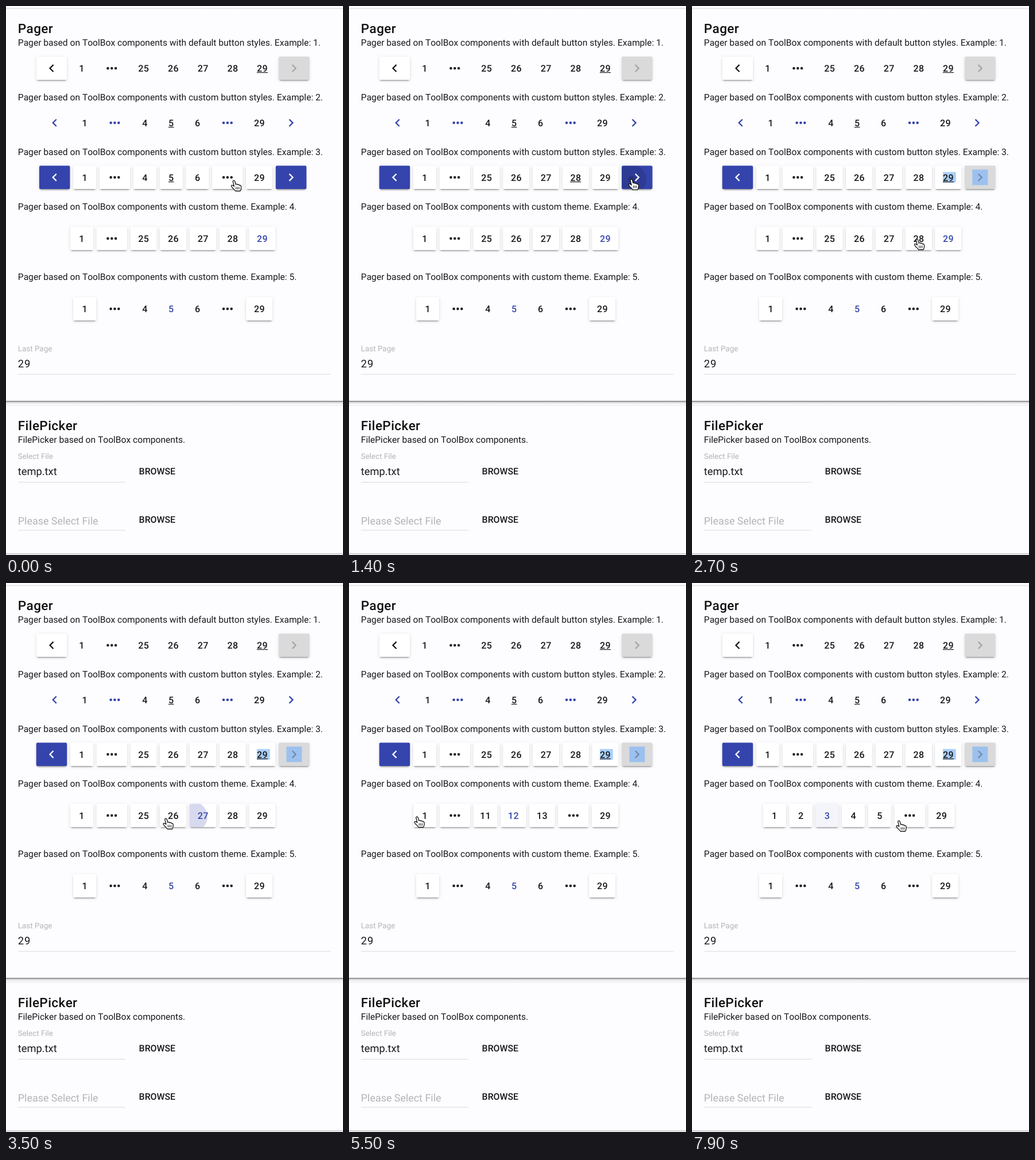
Write an HTML page with a canvas that moves like this. It is 587 px wide and 954 px high and loops after 8 s.

```html
<!DOCTYPE html>
<html lang="en">
<head>
<meta charset="utf-8">
<title>Pager and FilePicker</title>
<style>
html, body { margin: 0; width: 100%; height: 100%; overflow: hidden; background: #fdfcfe; }
canvas { display: block; width: 587px; height: 954px; }
</style>
</head>
<body>
<canvas id="stage"></canvas>
<script>
const W = 587, H = 954, LOOP = 8000, STEP = 100;
const MID = 290.6, GAP = 5.5, BTN_H = 40.6, LAST = 29, UNIT = 1.139;
const INK = '#18181a', BLUE = '#3544ac', FAINT = '#b4b4b7', RULE = '#d9d9dc';
const FONT = 'Roboto, Arial, sans-serif';

const canvas = document.getElementById('stage');
const ctx = canvas.getContext('2d');
const dpr = window.devicePixelRatio || 1;
canvas.width = W * dpr;
canvas.height = H * dpr;

// Clicks: time, page shown afterwards, key of the button pressed, ripple centre
const clicks3 = [
  [100, 17, 'dotsR', 396, 303], [300, 23, 'dotsR', 396, 303], [500, 26, 'dotsR', 396, 303],
  [1200, 27, 'next', 492, 301], [1400, 28, 'next', 492, 301], [1600, 29, 'next', 492, 301]
];
const clicks4 = [
  [3300, 27, 27, 325, 406], [3700, 26, 26, 279, 409], [4100, 25, 25, 235, 408],
  [4600, 12, 'dotsL', 183, 407], [5600, 1, 1, 119, 406], [7200, 3, 3, 240, 412]
];
const SELECT_AT = 1800;

// Pointer path: time, x, y of the tip
const path = [
  [0, 397, 303], [900, 397, 303], [1200, 492, 301], [1900, 490.5, 300], [2100, 490.5, 300],
  [2700, 392, 405], [2900, 392, 405], [3300, 330, 408], [3500, 278.5, 409], [3800, 278.5, 409],
  [4100, 235, 408], [4200, 235, 408], [4500, 183, 407], [4800, 183, 407], [5400, 118.5, 406],
  [5700, 118.5, 406], [6300, 384.5, 413], [6500, 384.5, 413], [7000, 240, 412],
  [7300, 240, 412], [7900, 360.5, 413]
];

function pointerAt(t) {
  const i = path.findIndex(p => p[0] > t);
  if (i < 0) return path[path.length - 1].slice(1);
  const [t0, x0, y0] = path[i - 1], [t1, x1, y1] = path[i];
  const u = (t - t0) / (t1 - t0), e = u * u * (3 - 2 * u);
  return [x0 + (x1 - x0) * e, y0 + (y1 - y0) * e];
}

function pageAt(clicks, t, first) {
  return clicks.reduce((page, c) => t >= c[0] ? c[1] : page, first);
}

function text(str, x, y, size, color = INK, weight = 400, spacing = 0, align = 'left') {
  ctx.font = `${weight} ${size}px ${FONT}`;
  ctx.letterSpacing = spacing + 'px';
  ctx.textAlign = align;
  ctx.fillStyle = color;
  ctx.fillText(str, x, y);
}

function rect(x, y, w, h, color) {
  ctx.fillStyle = color;
  ctx.fillRect(x, y, w, h);
}

function box(x, y, w, h, r = 2.2) {
  ctx.beginPath();
  ctx.roundRect(x, y, w, h, r);
}

function raised(b, y, color) {
  // offset, blur, inset, opacity
  for (const [dy, blur, inset, a] of [[1, 5, 0, .12], [2, 2, 0, .14], [3, 1, 2, .2]]) {
    ctx.save();
    ctx.shadowColor = `rgba(0,0,0,${a})`;
    ctx.shadowOffsetY = dy * UNIT * dpr;
    ctx.shadowBlur = blur * UNIT * dpr;
    ctx.fillStyle = color;
    // inset keeps the repeated fills from thickening the button edge
    const d = Math.max(inset, .5);
    box(b.x + d, y + d, b.w - 2 * d, BTN_H - 2 * d);
    ctx.fill();
    ctx.restore();
  }
  ctx.fillStyle = color;
  box(b.x, y, b.w, BTN_H);
  ctx.fill();
}

function icon(key, cx, cy, color) {
  ctx.save();
  ctx.translate(cx, cy);
  ctx.scale(UNIT, UNIT);
  ctx.fillStyle = color;
  ctx.beginPath();
  if (key === 'prev' || key === 'next') {
    if (key === 'next') ctx.scale(-1, 1);
    [[3.41, -4.59], [2, -6], [-4, 0], [2, 6], [3.41, 4.59], [-1.17, 0]].forEach(p => ctx.lineTo(...p));
  } else {
    for (const x of [-6, 0, 6]) {
      ctx.moveTo(x + 2, 0);
      ctx.arc(x, 0, 2, 0, 7);
    }
  }
  ctx.fill();
  ctx.restore();
}

function btnWidth(key) {
  if (typeof key === 'string') return 53.5;
  if (key < 10) return 40.3;
  if (key === 11) return 42;
  return key < 20 ? 44.5 : 46.2;
}

function layout(page, arrows) {
  let keys;
  if (page <= 3) keys = [1, 2, 3, 4, 5, 'dotsR', LAST];
  else if (page >= LAST - 2) keys = [1, 'dotsL', 25, 26, 27, 28, LAST];
  else keys = [1, 'dotsL', page - 1, page, page + 1, 'dotsR', LAST];
  if (arrows) keys = ['prev', ...keys, 'next'];
  const total = keys.reduce((s, k) => s + btnWidth(k) + GAP, -GAP);
  let x = MID - total / 2;
  return keys.map(key => {
    const b = { key, x, w: btnWidth(key) };
    b.off = key === 'next' && page === LAST;
    x += b.w + GAP;
    return b;
  });
}

function ripples(b, y, clicks, t, rgb, strength) {
  for (const [t0, , key, cx, cy] of clicks) {
    const age = t - t0;
    if (key !== b.key || b.off || age < 0 || age >= 900) continue;
    ctx.save();
    box(b.x, y, b.w, BTN_H);
    ctx.clip();
    ctx.fillStyle = `rgba(${rgb},${strength * (1 - age / 900)})`;
    ctx.beginPath();
    ctx.arc(cx, cy, 6 + age * .1, 0, 7);
    ctx.fill();
    ctx.restore();
  }
}

// style: arrows, arrowFill, iconColor, lift(key), mark ('line' or 'blue'), clicks, rgb, strength
function pager(cy, page, style, t, selected) {
  const y = cy - BTN_H / 2;
  const row = layout(page, style.arrows);
  for (const b of row) {
    const arrow = b.key === 'prev' || b.key === 'next';
    const cx = b.x + b.w / 2;
    const lifted = style.lift(b.key);
    if (lifted) raised(b, y, b.off ? '#dadadb' : arrow ? style.arrowFill : '#fff');
    if (style.clicks) ripples(b, y, style.clicks, t, style.rgb, style.strength);
    if (typeof b.key === 'string') {
      if (b.off && selected) rect(cx - 13.4, cy - 13.6, 27, 27, '#9cc1ef');
      let color = style.iconColor || INK;
      if (arrow && lifted) color = style.arrowFill === BLUE ? '#fff' : INK;
      if (b.off) color = selected ? '#7489aa' : '#a5a5a7';
      icon(b.key, cx, cy, color);
    } else {
      const current = b.key === page;
      if (current && selected) rect(cx - 9.5, cy - 9.3, 22.8, 18.4, '#a9cff9');
      const color = current && style.mark === 'blue' ? BLUE : INK;
      text(String(b.key), cx + .2, cy + 5.7, 16, color, 500, .4, 'center');
      if (current && style.mark === 'line') {
        const half = b.key < 10 ? 4.8 : 9.5;
        rect(cx - half, Math.round(cy + 7.2), half * 2, 1.2, INK);
      }
    }
  }
  return row.filter(b => !b.off).map(b => ({ x: b.x, y, w: b.w }));
}

const styles = [
  { arrows: true, arrowFill: '#fff', mark: 'line', lift: k => k === 'prev' || k === 'next' },
  { arrows: true, iconColor: BLUE, mark: 'line', lift: () => false },
  { arrows: true, arrowFill: BLUE, mark: 'line', lift: () => true,
    clicks: clicks3, rgb: '0,0,0', strength: .17 },
  { mark: 'blue', lift: () => true, clicks: clicks4, rgb: '53,68,172', strength: .25 },
  { mark: 'blue', lift: k => k === 1 || k === LAST }
];

const HAND = new Path2D('M-1.7 2Q-1.8.2-.2.2Q1.3.2 1.8 2L3.2 7Q5.4 5.6 6.4 7.6Q8.6 6.6 9.5 8.6' +
  'Q12.6 8 12.6 11V13.5Q12.3 16 11 18.5H2.6Q.8 15.7-2 13.6L-4.2 10.6Q-5 8.8-3.5 8.4Q-2 8.2.3 10.4Z');
const ARROW = new Path2D('M0 0V15.6L3.6 12.2L6 17.8L8.6 16.7L6.2 11.2H11.2Z');

function hand(x, y) {
  ctx.save();
  ctx.translate(x, y);
  ctx.lineJoin = ctx.lineCap = 'round';
  ctx.fillStyle = '#fff';
  ctx.strokeStyle = '#111';
  ctx.lineWidth = 1.3;
  ctx.fill(HAND);
  ctx.stroke(HAND);
  ctx.lineWidth = 1;
  ctx.beginPath();
  for (const lx of [3.7, 6.3, 8.9]) {
    ctx.moveTo(lx, 11.8);
    ctx.lineTo(lx + .1, 15.3);
  }
  ctx.stroke();
  ctx.restore();
}

function arrow(x, y) {
  ctx.save();
  ctx.translate(x, y);
  ctx.strokeStyle = '#fff';
  ctx.lineWidth = 2;
  ctx.lineJoin = 'round';
  ctx.stroke(ARROW);
  ctx.fillStyle = '#000';
  ctx.fill(ARROW);
  ctx.restore();
}

function shade(y, h, from, to) {
  const g = ctx.createLinearGradient(0, y, 0, y + h);
  g.addColorStop(0, from);
  g.addColorStop(1, to);
  rect(0, y, W, h, g);
}

function cards() {
  rect(0, 0, W, H, '#fdfcfe');
  shade(3, 3, '#efeff1', '#f2f2f4');
  rect(0, 4, W, 1, '#e8e8ea');
  rect(0, 686, W, 2, '#98989b');
  shade(688, 4, '#d2d2d5', '#f8f8fa');
  rect(0, 693, W, 1.5, '#ededef');
  rect(0, 951, W, 2, '#cfcfd2');
}

function labels() {
  const x = 20.8;
  ctx.fontKerning = 'none';
  text('Pager', x, 47, 22.5, '#111', 500, .4);
  const tails = ['default button styles', 'custom button styles', 'custom button styles', 'custom theme', 'custom theme'];
  const lines = [69, 164, 259, 353.5, 476];
  tails.forEach((s, i) =>
    text(`Pager based on ToolBox components with ${s}. Example: ${i + 1}.`, x, lines[i], 15.6));

  text('Last Page', x, 599.5, 13.4, FAINT);
  text('29', x, 627.5, 18.4, INK, 400, .9);
  rect(21, 639.5, 544.5, 1, RULE);

  text('FilePicker', x, 737, 22.5, '#111', 500, .4);
  text('FilePicker based on ToolBox components.', x, 759, 15.6);
  text('Select File', x, 787, 13.4, FAINT);
  text('temp.txt', x, 814.5, 18.3);
  text('Please Select File', x, 900.5, 17.9, FAINT);
  for (const y of [827, 910.5]) rect(21, y, 187, 1, RULE);
  for (const y of [814, 897.5]) text('BROWSE', 231.6, y, 15.9, INK, 500);
  ctx.fontKerning = 'normal';
}

function draw(t) {
  ctx.setTransform(dpr, 0, 0, dpr, 0, 0);
  ctx.textRendering = 'geometricPrecision';
  cards();
  labels();
  pager(108.2, LAST, styles[0], t);
  pager(203, 5, styles[1], t);
  const targets = [
    ...pager(297.8, pageAt(clicks3, t, 5), styles[2], t, t >= SELECT_AT),
    ...pager(404, pageAt(clicks4, t, LAST), styles[3], t)
  ];
  pager(526.3, 5, styles[4], t);

  const [px, py] = pointerAt(t);
  const over = targets.some(b => px >= b.x && px <= b.x + b.w && py >= b.y && py <= b.y + BTN_H);
  (over ? hand : arrow)(px, py);
}

const start = performance.now();
function tick() {
  const t = (performance.now() - start) % LOOP;
  draw(Math.floor(t / STEP) * STEP);
  requestAnimationFrame(tick);
}
tick();
</script>
</body>
</html>
```
